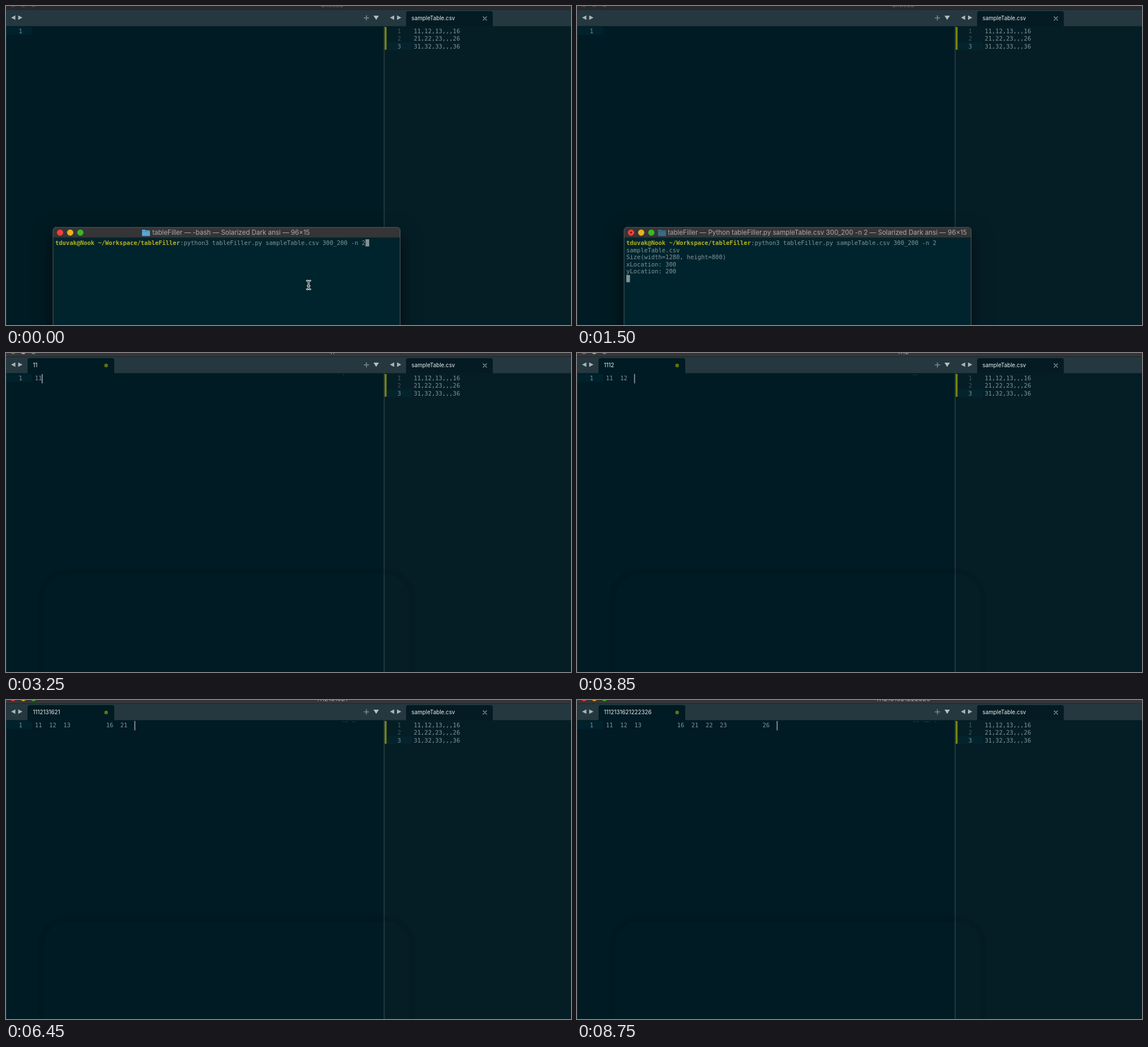
An HTML page with a canvas that plays this animation: 997x562 px, repeating every 9 s.

```html
<!DOCTYPE html>
<html lang="en">
<head>
<meta charset="utf-8">
<title>Table filler</title>
<style>
html, body { margin: 0; width: 100%; height: 100%; overflow: hidden; background: #001b23; }
canvas { display: block; }
</style>
</head>
<body>
<canvas id="stage" width="997" height="562"></canvas>
<script>
const g = document.getElementById('stage').getContext('2d');
const LOOP = 9000, CHAR = 6.292;
const MONO = '10.45px "DejaVu Sans Mono", monospace';
const UI = 'Inter, sans-serif';
const LIGHTS = ['#ee4239', '#e7b122', '#3fb527'];

// Key presses in the editor: [time, key]
const KEYS = [
  [3150, '1'], [3200, '1'], [3350, '\t'],
  [3650, '1'], [3700, '2'], [3850, '\t'],
  [4050, '1'], [4200, '3'], [4300, '\t'], [4750, '\t'], [5150, '\t'],
  [5500, '1'], [5550, '6'], [5650, '\t'],
  [6200, '2'], [6300, '1'], [6450, '\t'],
  [6750, '2'], [6800, '2'], [6900, '\t'],
  [7250, '2'], [7300, '3'], [7400, '\t'], [7750, '\t'], [8250, '\t'],
  [8600, '2'], [8650, '6'], [8750, '\t']
];

function rect(x, y, w, h, color) {
  g.fillStyle = color;
  g.fillRect(x, y, w, h);
}

function round(x, y, w, h, radii, color) {
  g.fillStyle = color;
  g.beginPath();
  g.roundRect(x, y, w, h, radii);
  g.fill();
}

function dot(x, y, r, color) {
  g.fillStyle = color;
  g.beginPath();
  g.arc(x, y, r, 0, 7);
  g.fill();
}

function text(s, x, y, color, font = MONO, align = 'left') {
  g.font = font;
  g.fillStyle = color;
  g.textAlign = align;
  g.fillText(s, x, y);
}

function poly(color, ...points) {
  g.fillStyle = color;
  g.beginPath();
  for (const [x, y] of points) g.lineTo(x, y);
  g.fill();
}

function arrows(x) {
  const c = '#aab4b7';
  poly(c, [x - 4, 20.5], [x + 3.5, 16.5], [x + 3.5, 24.5]);
  poly(c, [x + 16, 20.5], [x + 8.5, 16.5], [x + 8.5, 24.5]);
}

function tab(x, label, color) {
  round(x, 9, 153, 27, [4, 4, 0, 0], color);
  text(label, x + 9.5, 25.3, '#e9eeee', '9.8px ' + UI);
}

function pointer(x, y) {
  g.lineCap = 'round';
  for (const [w, c] of [[3, '#e8eeee'], [1, '#17272c']]) {
    g.lineWidth = w;
    g.strokeStyle = c;
    g.beginPath();
    for (const s of [-1, 1]) {
      g.moveTo(x - 3, y + 7.5 * s);
      g.quadraticCurveTo(x, y + 7.5 * s, x, y + 5 * s);
      g.quadraticCurveTo(x, y + 7.5 * s, x + 3, y + 7.5 * s);
    }
    g.moveTo(x, y - 5);
    g.lineTo(x, y + 5);
    g.moveTo(x - 1.7, y + 1.5);
    g.lineTo(x + 1.7, y + 1.5);
    g.stroke();
  }
}

function typed(t) {
  let line = '', digits = '';
  for (const [at, key] of KEYS) {
    if (at > t) break;
    if (key === '\t') line = line.padEnd((line.length >> 2) * 4 + 4);
    else { line += key; digits += key; }
  }
  return { line, title: digits.slice(0, digits.length & ~1) };
}

function editor(t) {
  const active = t >= 3000, { line, title } = typed(t);
  rect(0, 0, 997, 562, '#001b23');
  rect(668, 35, 329, 527, '#051e26');
  rect(0, 0, 997, 7, active ? '#353538' : '#29292c');
  LIGHTS.forEach((c, i) => dot(12.5 + 18 * i, -3.7, 5.6, active ? c : '#454548'));
  text(title || 'untitled', 575.5, 1.5, active ? '#a8a8aa' : '#68686b', '11.2px ' + UI, 'center');
  rect(0, 7, 997, 28.5, '#253840');
  rect(0, 6, 997, 1, '#1b282e');
  rect(0, 35, 1, 527, '#18323a');

  arrows(13);
  arrows(681.5);
  rect(631.5, 20, 9, 1.8, '#728085');
  rect(635.1, 16.4, 1.8, 9, '#728085');
  poly('#b4bdbf', [648.5, 17], [658, 17], [653.2, 24.5]);
  rect(666.5, 35, 1.7, 527, '#2a3c43');
  tab(706, 'sampleTable.csv', '#051b23');
  g.strokeStyle = '#8b989c';
  g.lineWidth = 1.4;
  g.beginPath();
  g.moveTo(842, 19); g.lineTo(848, 25);
  g.moveTo(848, 19); g.lineTo(842, 25);
  g.stroke();

  rect(1, 37, 45, 14, '#00222c');
  text('1', 22.5, 48, '#7d9094');
  rect(668.3, 37, 3.2, 40, '#7e8b09');
  rect(672, 64, 44, 13.5, '#04242d');
  ['11,12,13,,,16', '21,22,23,,,26', '31,32,33,,,36'].forEach((row, i) => {
    const y = 48 + 13.45 * i;
    text(i + 1, 690.8, y, i === 2 ? '#7d9094' : '#43575d');
    text(row, 719.5, y, '#82949a');
  });

  if (title) {
    tab(38, title, '#001b23');
    dot(176.7, 22, 3.2, '#617407');
  }
  text(line, 51, 48, '#82949a');
  [...line].forEach((ch, i) => {
    if (ch !== ' ') rect(594.5 + 0.85 * i, 37.7, 0.6, 1.2, '#486066');
  });
  if (active) rect(50.4 + CHAR * line.length, 37, 1.6, 16.5, '#93a2a3');
}

function folder(x, color) {
  round(x, 394, 6, 4, 1, color);
  round(x, 395.3, 14, 10, 1, color);
  rect(x, 397.2, 14, 0.7, 'rgba(0,25,45,.25)');
}

function terminal(t) {
  const entered = t >= 650, running = t >= 700, printed = t >= 1500;
  g.save();
  g.shadowColor = 'rgba(0,0,0,.6)';
  g.shadowBlur = 34;
  g.shadowOffsetY = 12;
  round(83, 390, 612.5, 200, 5, '#00242d');
  g.restore();
  round(83, 390, 612.5, 18.5, [5, 5, 0, 0], '#353538');
  rect(83, 407.7, 612.5, 0.8, '#17181a');
  g.strokeStyle = '#5b6265';
  g.lineWidth = 0.9;
  g.beginPath();
  g.roundRect(83, 390, 612.5, 200, 5);
  g.stroke();

  LIGHTS.forEach((c, i) => dot(95.4 + 17.9 * i, 399.2, 5.5, c));
  if (running) dot(95.4, 399.2, 1.6, '#6d100b');
  const job = running ? 'Python tableFiller.py sampleTable.csv 300_200 -n 2' : '-bash';
  folder(running ? 143 : 240, running ? '#3b6c86' : '#57a8d6');
  text(`tableFiller — ${job} — Solarized Dark ansi — 96×15`, running ? 424 : 397.2, 403.3,
    '#a9a9ab', '11.55px ' + UI, 'center');

  const gray = '#82949a';
  text('tduvak@Nook ~/Workspace/tableFiller', 87, 421, '#b5b31f', 'bold ' + MONO);
  text(':python3 tableFiller.py sampleTable.csv 300_200 -n 2', 87 + 35 * CHAR, 421, gray);
  if (printed) {
    ['sampleTable.csv', 'Size(width=1280, height=800)', 'xLocation: 300', 'yLocation: 200']
      .forEach((s, i) => text(s, 87, 433.6 + 12.6 * i, gray));
  }
  const row = printed ? 5 : entered ? 1 : 0;
  rect(87 + (entered ? 0 : 87 * CHAR), 411 + 12.6 * row, 6.5, 12.6, '#839294');
  if (!entered) pointer(534, 491.5);
}

// Faint trace of the closed window's shadow
function trace() {
  g.strokeStyle = 'rgba(0,12,16,.13)';
  g.lineWidth = 10;
  g.beginPath();
  g.roundRect(62, 385, 655, 300, 48);
  g.stroke();
}

function draw(now) {
  const t = now % LOOP;
  editor(t);
  if (t < 2950) terminal(t);
  else {
    trace();
    if (t < 3150 || (t >= 6000 && t < 6200)) pointer(260.3, 112.5);
  }
}

const start = performance.now();
function tick() {
  draw(performance.now() - start);
  requestAnimationFrame(tick);
}
tick();
</script>
</body>
</html>
```
